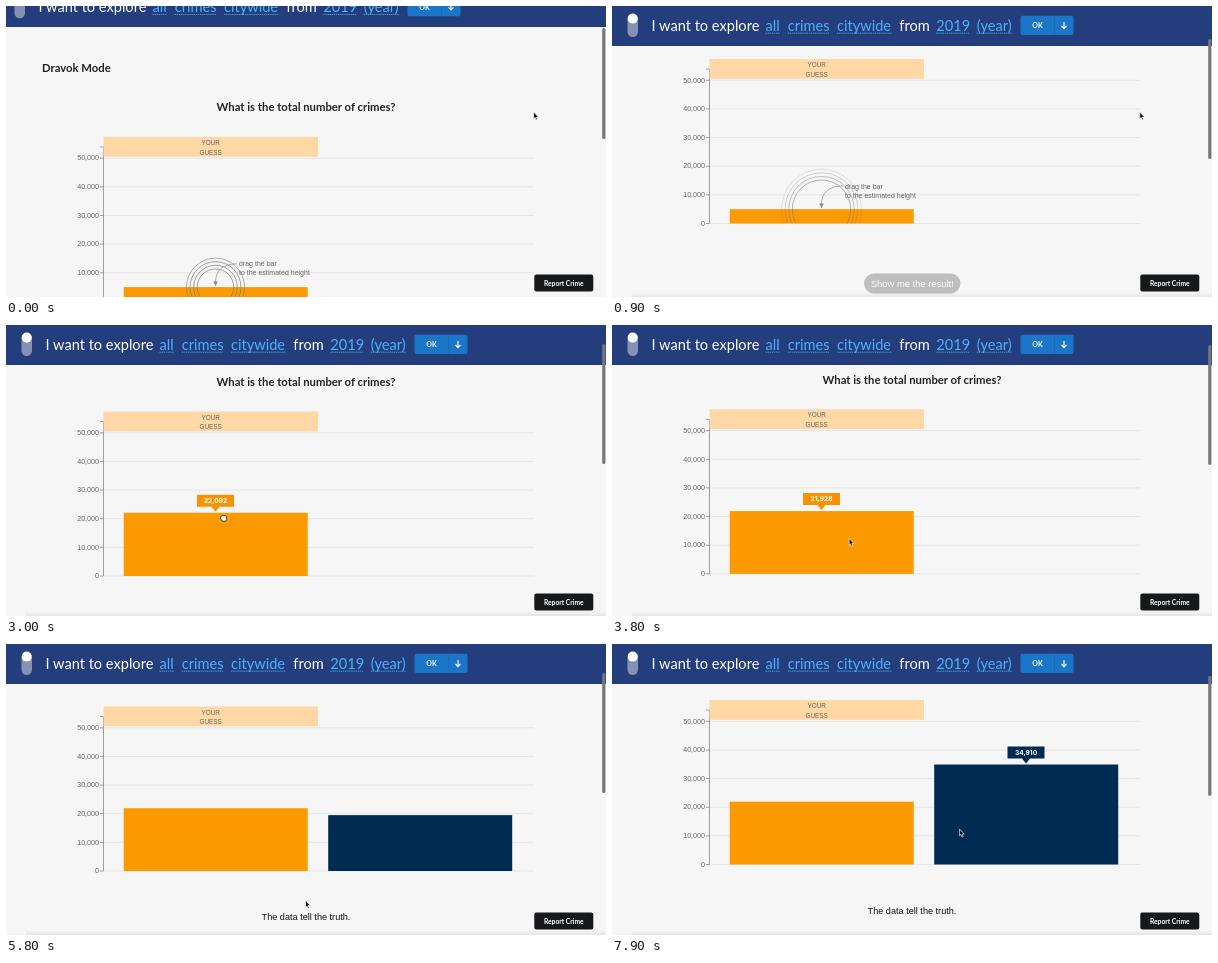
These frames come from a looping animation (600x291 px, 8 s). An HTML page:

```html
<!DOCTYPE html>
<html lang="en">
<head>
<meta charset="utf-8">
<title>Guess the number</title>
<style>
  html, body { margin: 0; width: 100%; height: 100%; overflow: hidden; background: #f6f6f6; }
  svg { display: block; width: 600px; height: 291px; }
  text { font-family: "Liberation Sans", Arial, sans-serif; font-size: 7px; fill: #666; dominant-baseline: central; }
  .lato { font-family: Lato, sans-serif; }
  .title { font-size: 11.3px; font-weight: 700; fill: #222; }
  .menu { font-size: 14.6px; fill: #fff; }
  .link { fill: #4db2f5; }
  .mid { text-anchor: middle; }
  .tip text { font-family: Inter, sans-serif; font-size: 6.6px; font-weight: 700; fill: #fff; text-anchor: middle; }
</style>
</head>
<body>
<svg viewBox="0 0 600 291">
  <defs>
    <linearGradient id="shade" x1="0" y1="0" x2="0" y2="1">
      <stop offset="0" stop-color="#000" stop-opacity="0"/>
      <stop offset="1" stop-color="#000" stop-opacity=".07"/>
    </linearGradient>
    <clipPath id="plot"><rect x="98" y="-160" width="430" height="160"/></clipPath>
  </defs>
  <rect width="600" height="291" fill="#f6f6f6"/>

  <!-- The chart's zero line is y = 0 in this group -->
  <g id="page">
    <text class="lato title" x="36" y="-233.6">Dravok Mode</text>
    <text class="lato title mid" x="300" y="-194.6">What is the total number of crimes?</text>
    <g id="axis"></g>
    <rect x="97.5" y="-164.5" width="214.5" height="19.8" fill="#ffd8a6"/>
    <text class="mid" x="204.7" y="-159" style="font-size:6.4px">YOUR</text>
    <text class="mid" x="204.7" y="-149.2" style="font-size:6.4px">GUESS</text>
    <rect id="guess" x="117.7" width="184" fill="#fd9a02"/>
    <rect id="truth" x="322.2" width="184" fill="#002b52"/>
    <g id="hint">
      <g id="rings" clip-path="url(#plot)" fill="none" stroke="#777" stroke-width=".9"></g>
      <path d="M231 -37.6C217 -37.6 209.5 -31 209.5 -19" fill="none" stroke="#999" stroke-width=".8"/>
      <path d="M207.3 -20H211.7L209.5 -15.2Z" fill="#888"/>
      <text x="233" y="-37.5" fill="#444">drag the bar</text>
      <text x="233" y="-28.5" fill="#444">to the estimated height</text>
    </g>
    <g id="guessTip" class="tip">
      <path d="M-18.5 -18H18.5V-6H4L0 -1L-4 -6H-18.5Z" fill="#f79204"/>
      <text y="-11.9"></text>
    </g>
    <g id="truthTip" class="tip">
      <path d="M-18.5 -18H18.5V-6H4L0 -1L-4 -6H-18.5Z" fill="#002b52"/>
      <text y="-11.9">34,910</text>
    </g>
    <g id="button">
      <rect x="252" y="50" width="96.5" height="20" rx="10"/>
      <text class="mid" x="300.3" y="60.3" style="font-size:9.4px;fill:#fff">Show me the result!</text>
    </g>
    <text id="verdict" class="mid" x="300" y="46.2" style="font-size:9.15px;fill:#111">The data tell the truth.</text>
  </g>

  <rect id="footShade" x="20" y="286" width="580" height="5" fill="url(#shade)"/>

  <rect id="band" width="600" height="40" fill="#243e7d"/>
  <g id="menu">
    <rect x="15.5" y="8" width="10.5" height="23" rx="5.2" fill="#8591b3"/>
    <circle cx="20.7" cy="12.6" r="5" fill="#fff"/>
    <g id="words"></g>
    <rect x="408.5" y="9.7" width="53" height="19.3" rx="2" fill="#1b76c8"/>
    <path d="M442.5 9.7V29" stroke="#1869b8" stroke-width=".7"/>
    <text class="lato mid" x="425.5" y="19.4" style="font-weight:700;fill:#fff">OK</text>
    <path d="M452 16V22.4M449.5 20L452 22.6L454.5 20" fill="none" stroke="#fff" stroke-width="1.1"/>
  </g>

  <rect id="thumb" x="596.2" width="3.2" rx="1.6" fill="#777"/>
  <rect x="528.3" y="268.5" width="59" height="17" rx="2" fill="#171819"/>
  <text class="lato mid" x="557.8" y="277.2" style="font-size:6.7px;font-weight:700;fill:#fff">Report Crime</text>

  <g id="cursor">
    <path id="arrow" d="M0 0V6.8L1.5 5.5L2.6 8L3.7 7.5L2.6 5.1H4.7Z" fill="#111" stroke="#fff" stroke-width=".6"/>
    <path id="hand" d="M-1 -3.6Q0 -4.6 .7 -3.4L1.2 -1.2Q2 -1.8 2.5 -.8Q3.4 -1.2 3.8 0V2.4L2.6 4.4H-.8L-3 1.2Q-2.6 0 -1.2 .8Z" fill="#fff" stroke="#222" stroke-width=".8"/>
    <path id="fist" d="M-2 -1.6Q-1.2 -2.6 -.3 -1.8Q.6 -2.6 1.3 -1.7Q2.4 -2.2 2.9 -1V2L2 3.6H-1.2L-3 1.2V-.2Z" fill="#fff" stroke="#222" stroke-width=".8"/>
  </g>
</svg>
<script>
const LOOP = 8000, UNIT = 28.64 / 10000;
const $ = id => document.getElementById(id);
const clamp = x => Math.max(0, Math.min(1, x));
const smooth = x => x * x * (3 - 2 * x);
const easeOut = x => 1 - (1 - x) ** 2;

function add(parent, tag, attrs, label) {
  const node = document.createElementNS("http://www.w3.org/2000/svg", tag);
  for (const key in attrs) node.setAttribute(key, attrs[key]);
  if (label) node.textContent = label;
  return parent.appendChild(node);
}
const set = (id, attrs) => { for (const key in attrs) $(id).setAttribute(key, attrs[key]); };
const show = (id, on) => set(id, { visibility: on ? "visible" : "hidden" });
const move = (id, x, y) => set(id, { transform: `translate(${x} ${y})` });

// Keys are [time, value]; the value eases between neighbours.
function track(keys, t, ease = smooth) {
  const next = keys.findIndex(k => k[0] > t);
  if (next < 0) return keys[keys.length - 1][1];
  if (next === 0) return keys[0][1];
  const [t0, a] = keys[next - 1], [t1, b] = keys[next];
  return a + (b - a) * ease((t - t0) / (t1 - t0));
}

for (let n = 0; n <= 5; n++) {
  const y = -n * 28.64;
  add($("axis"), "path", { d: `M98 ${y}H528`, stroke: "#e3e3e3", "stroke-width": .8 });
  add($("axis"), "path", { d: `M94 ${y}H97.5`, stroke: "#888", "stroke-width": .8 });
  add($("axis"), "text", { x: 93, y: y + .2, "text-anchor": "end", style: "font-size:7.15px" },
    (n * 10000).toLocaleString("en-US"));
}
add($("axis"), "path", { d: "M94 -154.5H97.5V0", fill: "none", stroke: "#888", "stroke-width": .8 });

const rings = [0, 1, 2, 3].map(() => add($("rings"), "circle", { cx: 209.5, cy: -14.3 }));

[["I want to explore", 39.5], ["all", 153.5, 14], ["crimes", 175.7, 42], ["citywide", 225, 55],
 ["from", 287.3], ["2019", 324.3, 33], ["(year)", 364.7, 35.5]].forEach(([word, x, width]) => {
  add($("words"), "text", { x, y: 19.6, class: "lato menu" + (width ? " link" : "") }, word);
  if (width) add($("words"), "path", { d: `M${x} 27.2h${width}`, stroke: "#4db2f5", "stroke-width": .8, "stroke-dasharray": "1.4 .7" });
});

const scrollKeys = [[1050, 217.5], [1600, 251], [3700, 251], [4250, 227], [7400, 227], [7850, 220.5]];
const guessKeys = [[2350, 5000], [2950, 22092], [3150, 22092], [3350, 21928]];
const cursorX = [[1450, 527.7], [2050, 215], [2350, 215], [2900, 217.5], [3500, 217.5], [4500, 308],
  [5200, 308], [5700, 299.5], [7000, 299.5], [7600, 347.5]];
const cursorY = [[1450, 106], [2050, 231.5], [2350, 231.5], [2950, 192.5], [3500, 193], [4500, 287],
  [5200, 287], [5700, 256.5], [7000, 256.5], [7600, 185]];

function draw(t) {
  const base = t < 900 ? track([[0, 295.6], [850, 217.5]], t, easeOut) : track(scrollKeys, t);
  move("page", 0, base);

  // The bar slides in while the page begins to scroll.
  const hidden = 1 - smooth(clamp(t / 300));
  set("band", { y: -19 * hidden });
  move("menu", -7 * hidden, -18.7 * hidden);
  set("footShade", { opacity: 1 - hidden });
  const thumbTop = t < 900 ? track([[0, 22], [850, 33]], t, easeOut) : 33 - (base - 217.5) * .418;
  set("thumb", { y: thumbTop, height: 120 - 9 * hidden });

  const guess = track(guessKeys, t), guessHeight = guess * UNIT;
  set("guess", { y: -guessHeight, height: guessHeight });
  move("guessTip", 209.5, -guessHeight);
  $("guessTip").lastElementChild.textContent = Math.round(guess).toLocaleString("en-US");

  const dragged = t >= 2350, revealed = t >= 5000;
  show("hint", !dragged);
  show("guessTip", dragged && !revealed);
  show("button", !revealed);
  show("verdict", revealed);
  set("button", { fill: dragged ? "#002b52" : "#bebebe" });

  rings.forEach((ring, i) => {
    const r = 29 + 12.2 * t / 1000 - 3.6 * i;
    ring.setAttribute("r", r);
    ring.setAttribute("opacity", .75 * clamp((46 - r) / 20));
  });

  const truthHeight = 34910 * UNIT * smooth(clamp((t - 5100) / 1300));
  set("truth", { y: -truthHeight, height: truthHeight });
  move("truthTip", 414, -truthHeight);
  set("truthTip", { opacity: clamp((t - 6400) / 340) });

  const holding = t >= 2300 && t < 3500;
  const pointing = (t >= 1950 && t < 2300) || (t >= 4350 && t < 5000);
  move("cursor", track(cursorX, t), track(cursorY, t));
  show("fist", holding);
  show("hand", pointing);
  show("arrow", !holding && !pointing);
}

const start = performance.now();
function tick() {
  draw((performance.now() - start) % LOOP);
  requestAnimationFrame(tick);
}
draw(0);
requestAnimationFrame(tick);
</script>
</body>
</html>
```
